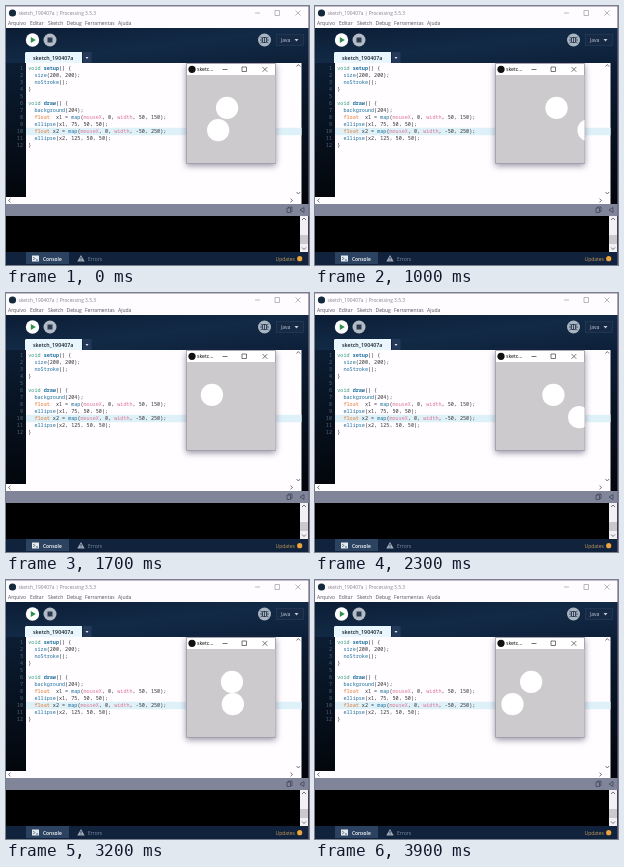
Write an HTML page that moves like this. It is 303 px wide and 259 px high and loops after 4000 ms.

```html
<!DOCTYPE html>
<html lang="pt">
<head>
<meta charset="utf-8">
<style>
  html, body { margin: 0; width: 100%; height: 100%; overflow: hidden; }
  svg { display: block; width: 100vw; height: 100vh; }
  text { font: 5px "Open Sans", sans-serif; white-space: pre; }
  .code text { font: 500 5.11px "Noto Sans Mono", monospace; }
  .keyword { fill: #33997e; }
  .type { fill: #e2762a; }
  .call { fill: #1d6f9c; }
  .entry { fill: #1d6f9c; font-weight: bold; }
  .variable { fill: #dc7595; }
  .icon { fill: none; stroke-width: .8; }
  .window { filter: drop-shadow(0 2px 3px #3a305088); }
</style>
</head>
<body>
<svg viewBox="0 0 303 259">
  <defs>
    <linearGradient id="navy" x2="1" y2="1">
      <stop stop-color="#0c1d35"/><stop offset=".5" stop-color="#122a46"/><stop offset="1" stop-color="#0d1f38"/>
    </linearGradient>
    <linearGradient id="side" x2="0" y2="1">
      <stop stop-color="#0c1d33"/><stop offset="1" stop-color="#02050a"/>
    </linearGradient>
    <clipPath id="stage"><path d="M181 69h88.5v88H181z"/></clipPath>
  </defs>

  <!-- title and menu -->
  <path fill="#fefcff" d="M0 0h303v23H0z"/>
  <path fill="#8d7c9b" d="M0 0h303v.6H0z"/>
  <circle cx="6.5" cy="7" r="3.6" fill="#142a3c"/>
  <text x="12.5" y="8.8" fill="#85818a" style="font-size:4.85px">sketch_190407a | Processing 3.5.3</text>
  <path class="icon" stroke="#aaa6ae" d="M249 7h5M269 4.5h4.5v5H269zM289.5 4.5l5 5m0-5l-5 5"/>
  <g id="menu" fill="#55515c"></g>

  <!-- toolbar -->
  <path fill="url(#navy)" d="M0 22h303v36H0z"/>
  <circle cx="26.5" cy="34" r="6.7" fill="#fff"/>
  <path fill="#2f8f4e" d="M24.8 31l5 3-5 3z"/>
  <circle cx="44" cy="34" r="6.5" fill="#b3bbc6"/>
  <path fill="#2c3a50" d="M41.5 31.5h5v5h-5z"/>
  <circle cx="258.5" cy="34" r="6.5" fill="#a9b4c1"/>
  <path class="icon" stroke="#1f3049" d="M256.5 31.5h4v5h-4zM258.5 31v6M254.5 31l2 1.5m4 0l2-1.5M254 34h2.5m4 0h2.5M254.5 37l2-1.5m4 0l2 1.5"/>
  <rect x="270.5" y="28.5" width="27" height="11" fill="#172a45" stroke="#2a3e59" stroke-width=".6"/>
  <text x="275" y="35.8" fill="#c3ccd8">Java</text>
  <path fill="#c3ccd8" d="M288.5 33h4l-2 2.5z"/>
  <path fill="#e9f6fd" d="M19 58V47l1-1h56v12z"/>
  <text x="27" y="53.8" fill="#18222b" style="font-weight:600;font-size:5.35px">sketch_190407a</text>
  <path fill="#24395a" d="M77 46h8.5v11H77z"/>
  <path fill="#dce5eb" d="M79.5 51h3l-1.5 2z"/>

  <!-- editor -->
  <path fill="url(#side)" d="M0 57h303v141H0z"/>
  <path fill="#fffdff" d="M20 57h275.5v135H20zM0 191h295.5v7H0z"/>
  <path fill="#dff1f8" d="M20 121.8h275.5v7.4H20z"/>
  <path class="icon" stroke="#555" d="M4.5 192.7l-2 1.8 2 1.8M284.5 192.7l2 1.8-2 1.8M290.5 60.5l1.8-2 1.8 2M290.5 186l1.8 2 1.8-2"/>
  <g class="code" id="code"></g>

  <!-- console -->
  <path fill="#80859a" d="M0 198h303v12H0z"/>
  <path class="icon" stroke="#3f465c" d="M281 202h3.5v4.5H281zM282.5 202v-1h3.5v4.5h-1.5M298 201.5v5l-4-2.5z"/>
  <path d="M0 210h303v36H0z"/>
  <path fill="#f3f0f5" d="M294 210h8v36h-8z"/>
  <path fill="#cbc8ce" d="M294 229h8v9h-8z"/>
  <path class="icon" stroke="#555" d="M296 214l2-2 2 2M296 241.5l2 2 2-2"/>
  <path fill="#10223c" d="M0 246h303v13H0z"/>
  <path fill="#2b4260" d="M20 246h43v12H20z"/>
  <path fill="#e4ebef" d="M26 249.5h7v6h-7z"/>
  <path class="icon" stroke="#2b4260" d="M27.3 251l1.5 1.5-1.5 1.5M30 254h2"/>
  <text x="37" y="254.5" fill="#fff" style="font-weight:600;font-size:4.9px">Console</text>
  <path fill="#a3acba" d="M75 249l3.7 6.5h-7.4z"/>
  <path class="icon" stroke="#10223c" d="M75 251v2.2m0 .6v.8"/>
  <text x="82" y="254.5" fill="#8290a5">Errors</text>
  <text x="269.5" y="254.5" fill="#c39a5c">Updates</text>
  <circle cx="293.7" cy="252.7" r="2.6" fill="#eda43a"/>
  <path fill="#79628a" d="M302.4 0h.6v259h-.6z"/>

  <!-- running sketch -->
  <path class="window" fill="#fff" stroke="#8f8898" stroke-width=".7" d="M180.5 57.5h89v100h-89z"/>
  <circle cx="186" cy="63.3" r="3.6" fill="#111"/>
  <text x="191" y="65.2" style="font-size:5.2px">sketc...</text>
  <path class="icon" stroke="#555" d="M216.5 63.5h5M236 61h4.5v4.5H236zM256.5 61l4.8 4.8m0-4.8l-4.8 4.8"/>
  <g clip-path="url(#stage)">
    <path fill="#cccacc" d="M181 69h89v88h-89z"/>
    <g transform="translate(181 68.6) scale(.445)" fill="#fff">
      <circle id="upper" cy="75" r="25"/>
      <circle id="lower" cy="125" r="25"/>
    </g>
  </g>
</svg>
<script>
const $ = id => document.getElementById(id);

const menu = { Arquivo: 2, Editar: 24, Sketch: 42, Debug: 60.5, Ferramentas: 79, Ajuda: 112 };
$('menu').innerHTML = Object.entries(menu)
  .map(([label, x]) => `<text x="${x}" y="18.8">${label}</text>`).join('');

const source = `void setup() {
  size(200, 200);
  noStroke();
}

void draw() {
  background(204);
  float  x1 = map(mouseX, 0, width, 50, 150);
  ellipse(x1, 75, 50, 50);
  float x2 = map(mouseX, 0, width, -50, 250);
  ellipse(x2, 125, 50, 50);
}`;
const styles = {
  keyword: /^void$/, type: /^float$/, entry: /^(setup|draw)$/,
  call: /^(size|noStroke|background|map|ellipse)$/, variable: /^(mouseX|width)$/
};
const paint = line => line.replace(/[a-z]\w*/gi, word => {
  const style = Object.keys(styles).find(name => styles[name].test(word));
  return style ? `<tspan class="${style}">${word}</tspan>` : word;
});
$('code').innerHTML = source.split('\n').map((line, i) => {
  const y = 63.6 + i * 7.08;
  return `<text x="17" y="${y}" text-anchor="end" fill="#55667a">${i + 1}</text>
    <text x="22.3" y="${y}" fill="#333">${paint(line)}</text>`;
}).join('');

// [time in ms, mouse position across the sketch from 0 to 1]
const mouse = [
  [0, .4], [500, .06], [600, .05], [1000, .86], [1100, .9], [1700, .06], [1800, .06], [2300, .79],
  [2400, .79], [2700, .06], [2900, .06], [3200, .51], [3500, .86], [3600, .86], [3900, .29], [4000, .29]
];
function mouseAt(t) {
  const i = mouse.findIndex(([time]) => time > t);
  const [t0, a] = mouse[i - 1], [t1, b] = mouse[i];
  const k = (t - t0) / (t1 - t0);
  return a + (b - a) * k * k * (3 - 2 * k);
}
function frame() {
  const m = mouseAt(Math.floor(performance.now() % 4000 / 100) * 100);
  $('upper').setAttribute('cx', 50 + 100 * m);
  $('lower').setAttribute('cx', -50 + 300 * m);
  requestAnimationFrame(frame);
}
frame();
</script>
</body>
</html>
```
